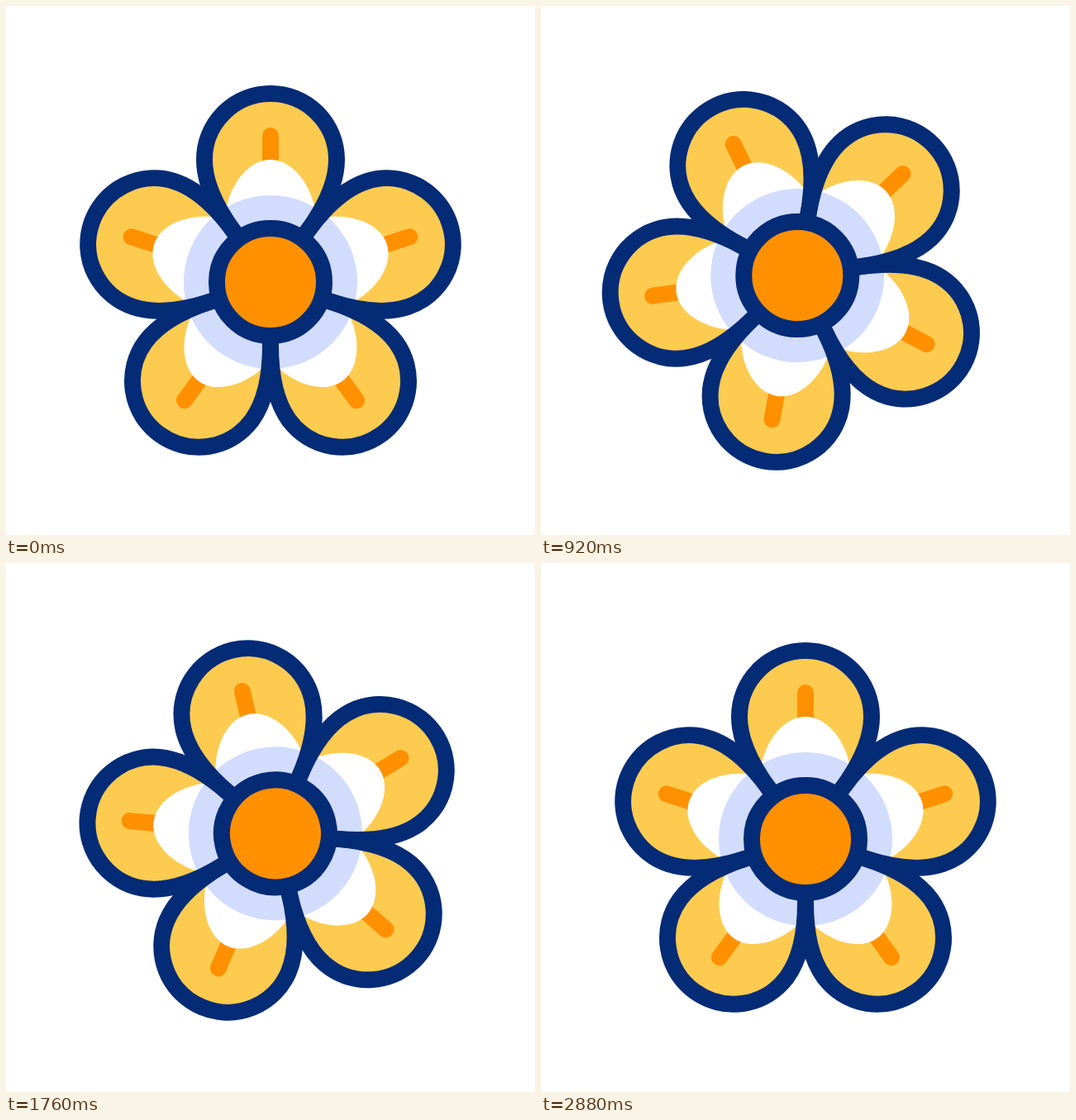
These frames come from a looping animation (640x640 px, 3000 ms). An HTML page:

```html
<!DOCTYPE html>
<html lang="en">
<head>
<meta charset="utf-8">
<title>Spinning flower</title>
<style>
  html, body { margin: 0; width: 100%; height: 100%; overflow: hidden; background: #fff; }
  svg { display: block; width: 100%; height: 100%; }
</style>
</head>
<body>
<svg viewBox="0 0 640 640">
  <defs>
    <path id="outline" d="M-35-48L-44.7-61.5C-63.5-87.4-80-118-80-148A80 80 0 0 1 80-148C80-118 63.5-87.4 44.7-61.5L35-48Z"/>
    <g id="petal">
      <use href="#outline" fill="#fdcb50"/>
      <path d="M0-177V-130" stroke="#ff9100" stroke-width="20" stroke-linecap="round"/>
      <path d="M0-148C25-148 46-122 53-92L45-62H-45L-53-92C-46-122-25-148 0-148Z" fill="#fff"/>
    </g>
    <use id="edge" href="#outline" fill="none" stroke="#042b76" stroke-width="20" stroke-linejoin="round"/>
  </defs>
  <g id="flower">
    <g id="petals"></g>
    <circle r="105" fill="#d2dcfd"/>
    <g id="edges"></g>
    <circle r="65" fill="#ff9100" stroke="#042b76" stroke-width="20"/>
  </g>
</svg>
<script>
const LOOP = 3000, STEP = 40;
const $ = id => document.getElementById(id);

function ring(group, part) {
  for (let i = 0; i < 5; i++) {
    const use = document.createElementNS('http://www.w3.org/2000/svg', 'use');
    use.setAttribute('href', part);
    use.setAttribute('transform', `rotate(${i * 72})`);
    group.append(use);
  }
}
ring($('petals'), '#petal');
ring($('edges'), '#edge');

// Progress 0..1 between two times, on a bezier with handles (a, 0) and (b, 1)
function leg(t, from, to, a = 1 / 3, b = 2 / 3) {
  const u = Math.min(1, Math.max(0, (t - from) / (to - from)));
  let lo = 0, hi = 1;
  for (let i = 0; i < 30; i++) {
    const s = (lo + hi) / 2, r = 1 - s;
    if (3 * s * r * r * a + 3 * s * s * r * b + s * s * s < u) lo = s; else hi = s;
  }
  return hi * hi * (3 - 2 * hi);
}

// Wind up backwards, spin past a full turn, settle; the centre drifts along
function pose(t) {
  const wind = leg(t, 200, 600);
  const spin = leg(t, 600, 2200, .352, .277);
  const settle = leg(t, 2200, 2880, .2, .3);
  const left = leg(t, 200, 700, .33, .33);
  const right = leg(t, 700, 2250, .33, .26);
  const home = leg(t, 2250, 2880);
  const rise = leg(t, 200, 800, .33, .33);
  const sink = leg(t, 800, 2150);
  const fall = leg(t, 2150, 2880);
  return {
    x: 320 - 11.2 * left + 18.6 * right - 7.4 * home,
    y: 334 - 8 * rise + 1.7 * sink + 6.3 * fall,
    angle: -11.6 * wind + 381.6 * spin - 10 * settle
  };
}

function draw(now) {
  const t = Math.floor((now % LOOP) / STEP + 1e-6) * STEP;
  const { x, y, angle } = pose(t);
  $('flower').setAttribute('transform', `translate(${x} ${y}) rotate(${angle})`);
}

let start;
function tick(now) {
  start ??= now;
  draw(now - start);
  requestAnimationFrame(tick);
}
draw(0);
requestAnimationFrame(tick);
</script>
</body>
</html>
```
